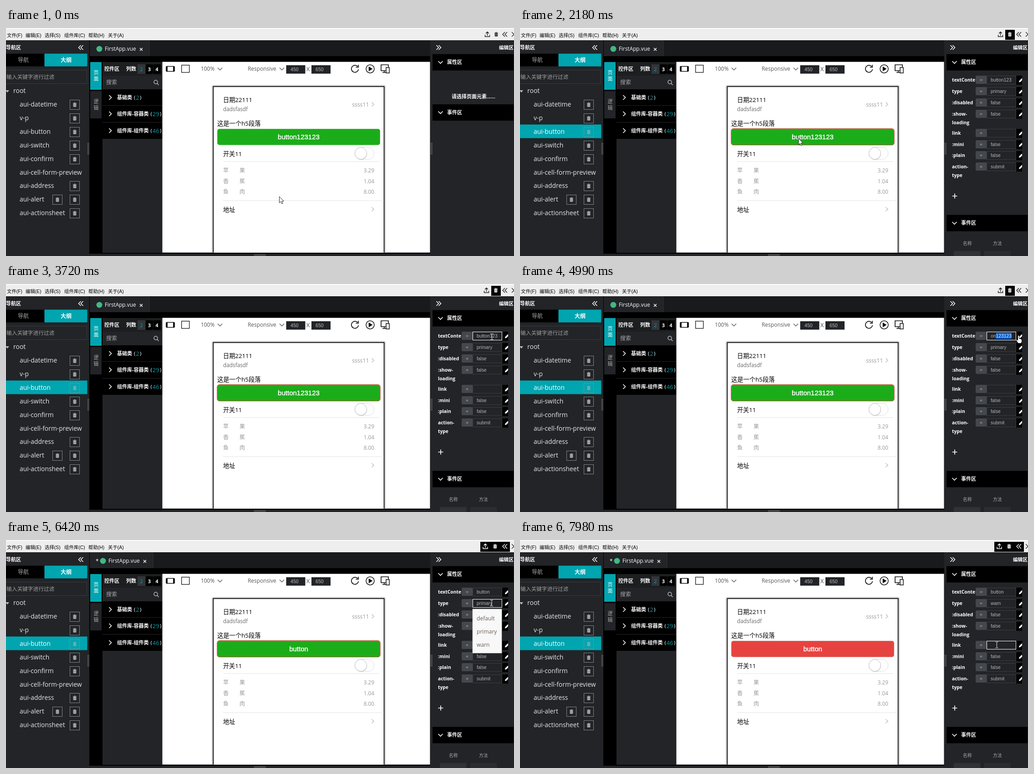
Write an HTML page that moves like this. It is 1116 by 502 pixels and loops after 8000 ms.

```html
<!DOCTYPE html>
<html lang="zh">
<head>
<meta charset="utf-8">
<title>Page designer</title>
<style>
html, body { margin: 0; width: 100%; height: 100%; overflow: hidden; background: #222427; }
svg { display: block; width: 100vw; height: 100vh; }
text { font-family: "Open Sans", "Noto Sans CJK SC", "Noto Sans CJK", sans-serif; white-space: pre; }
.arial { font-family: "Liberation Sans", "Noto Sans CJK SC", "Noto Sans CJK", sans-serif; }
</style>
</head>
<body>
<svg viewBox="0 0 1116 502">
  <defs>
    <filter id="glow" x="-10%" y="-10%" width="120%" height="120%"><feGaussianBlur stdDeviation="1.6"/></filter>
    <clipPath id="field"><rect x="1034" y="105" width="46.5" height="18"/></clipPath>
    <clipPath id="pens"><rect x="1090" y="100" width="13" height="230"/></clipPath>
    <clipPath id="labels"><rect x="940" y="100" width="60" height="240"/></clipPath>
    <clipPath id="canvas"><rect x="344" y="75" width="587" height="419.5"/></clipPath>
  </defs>
  <g id="base"></g>
  <g id="live"></g>
</svg>
<script>
const LOOP = 8000, PANEL = '#222427', CYAN = '#00a5b0', GREEN = '#1aad19', RED = '#e64340';
const PRESS = 1190, SELECT = 1370, ERASE = 5240, COMMIT = 6060, PICK = 7400, DONE = 7740;

const rect = (x, y, w, h, fill, extra = '') =>
  `<rect x="${x}" y="${y}" width="${w}" height="${h}" fill="${fill}" ${extra}/>`;
const frame = (x, y, w, h, color, extra = '') =>
  rect(x + .5, y + .5, w - 1, h - 1, 'none', `stroke="${color}" ${extra}`);
// y is the middle of the capitals
const text = (x, y, s, size, fill = '#fff', extra = '') =>
  `<text x="${x}" y="${y + size * .36}" font-size="${size}" fill="${fill}" ${extra}>${s}</text>`;
const path = (x, y, d, color, w = 1, fill = 'none') =>
  `<path transform="translate(${x} ${y})" d="${d}" stroke="${color}" stroke-width="${w}" fill="${fill}"/>`;
const each = (list, fn) => list.map(fn).join('');

const BOLD = 'font-weight="700"', ARIAL = 'class="arial"';
const MIDDLE = 'text-anchor="middle"', END = 'text-anchor="end"';
const RIGHT = 'M-2.5-5l5 5-5 5', DOWN = 'M-5-2.5l5 5 5-5';
const LESS = 'M0-5l-5 5 5 5M5-5l-5 5 5 5', MORE = 'M-5-5l5 5-5 5M0-5l5 5-5 5';
const UPLOAD = 'M-5 1v4h10v-4M0 3v-8M-3.5-2L0-5.5 3.5-2';

const trash = (x, y, color, back) => path(x, y, 'M-4-3.2h8M-1.4-4.6h2.8M-2.8-2v6h5.6v-6z', color, 1, color) +
  path(x, y, 'M-1.3-1v4M1.3-1v4', back, .7);
const dots = (x, y, cols, rows) => {
  let s = '';
  for (let i = 0; i < cols; i++)
    for (let j = 0; j < rows; j++) s += rect(x + i * 2.4, y + j * 2.4, 1.2, 1.2, '#999');
  return s;
};
const header = (y, name) => rect(937, y, 178, 36, '#000') +
  path(954.5, y + 18, DOWN, '#fff', 1.6) + text(969, y + 18, name, 11, '#fff', BOLD);

const NODES = ['datetime', '', 'button', 'switch', 'confirm', 'cell-form-preview', 'address', 'alert', 'actionsheet'];
function node(i, selected) {
  const y = 168 + 29.9 * i, by = Math.round(y + 1), name = NODES[i] ? 'aui-' + NODES[i] : 'v-p';
  const [edge, icon, back] = selected ? ['#5c9ba0', '#7db0b3', CYAN] : ['#858689', '#c4c4c4', PANEL];
  const box = x => frame(x, by - 11, 22, 22, edge) + trash(x + 11, by, icon, back);
  return (selected ? rect(0, 212.5, 178.5, 30, CYAN) : '') + text(30, y, name, 13.9, selected ? '#fff' : '#e8e8e8') +
    (i == 5 ? '' : box(140)) + (i == 7 ? box(102) : '');
}

function navigator() {
  return rect(0, 0, 1116, 27, '#eeeeee') + rect(0, 0, 1116, 1.5, '#fff') +
    each([[2, '文件(F)'], [43, '编辑(E)'], [85, '选择(S)'], [128, '组件库(C)'], [181, '帮助(H)'], [224, '关于(A)']],
      ([x, s]) => text(x, 16, s, 10.4, '#000', ARIAL)) +
    text(0, 43, '导航区', 11, '#fff', BOLD) + path(164.5, 43, LESS, '#fff', 1.5) +
    rect(0, 56.5, 84.5, 28, '#000') + rect(84.5, 56.5, 94, 28, CYAN) +
    text(38, 71, '导航', 12, '#aaa', MIDDLE) + text(132, 71, '大纲', 12, '#fff', MIDDLE + ' ' + BOLD) +
    frame(-2, 92, 180, 31, '#393b3f') + text(1, 108, '输入关键字进行过滤', 11.7, '#a0a0a0') +
    path(3, 139, 'M-4-2h8l-4 5z', 'none', 0, '#bbb') + text(16, 138, 'root', 14, '#e8e8e8') +
    each(NODES, (_, i) => node(i)) + dots(179, 253, 2, 11);
}

function library() {
  const group = (y, name, x, count) => rect(212, y - 18, 132, 36, '#000') + path(229, y, RIGHT, '#fff', 1.6) +
    text(244, y, name, 11, '#fff', BOLD) + text(x, y, '(', 11.5) +
    text(x + 4.5, y, count, 12.5, CYAN) + text(count > 9 ? 338 : 294, y, ')', 11.5);
  return rect(183, 27, 749, 475, '#000') + rect(184, 27, 748, 35, '#191a1c') +
    rect(185, 75, 25, 61, CYAN) + rect(185, 139, 25, 60, PANEL) +
    text(198, 98, '页', 11, '#fff', MIDDLE) + text(198, 112, '面', 11, '#fff', MIDDLE) +
    text(198, 162, '逻', 11, '#aaa', MIDDLE) + text(198, 176, '辑', 11, '#aaa', MIDDLE) +
    rect(212, 75, 132, 420, PANEL) + rect(212, 75, 132, 30, '#1c1e20') +
    text(216, 90, '控件区', 11, '#fff', BOLD) + text(264, 90, '列数', 11, '#fff', BOLD) +
    rect(289, 80, 17, 21, '#333538') + rect(307, 80, 16, 21, '#000') + rect(324, 80, 16, 21, '#000') +
    text(297.5, 91, 2, 11, CYAN, MIDDLE) + text(315, 91, 3, 11, '#fff', MIDDLE + ' ' + BOLD) +
    text(331.5, 91, 4, 11, '#fff', MIDDLE + ' ' + BOLD) +
    text(220, 120, '搜索', 12, '#a8a8a8') + path(329, 119, 'M4 0a4 4 0 1 0-8 0a4 4 0 1 0 8 0M3 3l3.5 3.5', '#bbb', 1.5) +
    group(153, '基础类', 281, 2) + group(189, '组件库-容器类', 317.5, 29) + group(226, '组件库-组件类', 317.5, 46) +
    rect(212, 170, 132, 1, PANEL) + rect(212, 207, 132, 1, PANEL) +
    rect(183, 497, 749, 5, PANEL) + dots(545, 498, 11, 2);
}

function toolbar() {
  return rect(343.5, 74.5, 588, 420, '#fff') +
    rect(352, 84.5, 18, 11, 'none', 'rx="1.5" stroke="#111" stroke-width="1.6"') +
    rect(351.5, 84.5, 3.5, 11, '#111') + rect(367, 84.5, 3.5, 11, '#111') +
    rect(385.7, 81.7, 17, 16, 'none', 'stroke="#222" stroke-width="1.4"') +
    text(428, 90, '100%', 11.9, '#5d5652') + path(470, 90, DOWN, '#5d5652', 1.3) +
    text(531, 90, 'Responsive', 11.9, '#5d5652') + path(606, 90, DOWN, '#5d5652', 1.3) +
    rect(615.5, 82, 42, 18.5, PANEL) + rect(671, 82, 42, 18.5, PANEL) +
    text(625, 91, 450, 10.6, '#bbb', ARIAL) + text(680, 91, 650, 10.6, '#bbb', ARIAL) + text(660, 90, 'X', 12.5, '#444') +
    path(766.5, 90, 'M6-5a7.7 7.7 0 1 0 1.7 6M7.5-9v5.5h-5.5', '#111', 1.7) +
    path(800, 90, 'M9 0a9 9 0 1 0-18 0a9 9 0 1 0 18 0', '#111', 1.5) + path(800, 90, 'M-3-5L5 0-3 5z', '#111', .5, '#111') +
    path(833, 90, 'M3 4h-12v-13h16v5M-6 8h8M-2 4v4', '#111', 1.7) + path(838.5, 93, 'M-3.5-6h7v12h-7z', '#111', 1.5, '#fff');
}

function phone() {
  const fruit = (y, a, b, price) => text(477, y, a, 12, '#999') + text(513, y, b, 12, '#999') +
    text(809, y, price, 11.7, '#999', END);
  return '<g clip-path="url(#canvas)">' +
    rect(455, 128.5, 376, 400, 'none', 'stroke="#777" stroke-width="3" filter="url(#glow)"') +
    rect(455.5, 129, 375, 400, '#fff', 'stroke="#111" stroke-width="1.7"') + '</g>' +
    text(477, 158, '日期22111', 13.2, '#000') + text(477, 179, 'dadsfasdf', 11.8, '#666') +
    text(760, 169, 'ssss11', 12.3, '#999') + path(806, 168, 'M-2.5-4.5l4.5 4.5-4.5 4.5', '#bbb', 1.4) +
    text(464, 210, '这是一个h5段落', 13.3, '#000') +
    text(477, 277, '开关11', 13.1, '#000') + rect(477, 293.5, 343, 1, '#e2e2e2') +
    rect(766, 262.5, 43, 27, '#fdfdfd', 'rx="13.5" stroke="#dfdfdf"') +
    '<circle cx="780" cy="277" r="13" fill="#aaa" opacity=".6"/>' +
    '<circle cx="779.5" cy="276" r="13" fill="#fff" stroke="#bbb" stroke-width=".8"/>' +
    fruit(314, '苹', '果', '3.29') + fruit(338, '香', '蕉', '1.04') + fruit(361, '鱼', '肉', '8.00') +
    rect(477, 379.5, 353, 1, '#e2e2e2') +
    text(477, 400, '地址', 13.3, '#000') + path(806, 399, 'M-2.5-4.5l4.5 4.5-4.5 4.5', '#bbb', 1.4);
}

const editor = () => dots(933, 253, 2, 11) + path(950.5, 43, MORE, '#fff', 1.5) +
  text(1115, 43, '编辑区', 10.7, '#fff', END + ' ' + BOLD) + header(57.5, '属性区');

function topIcons(t) {
  const saved = t >= COMMIT, picked = t >= SELECT, dark = '#222';
  const box = saved ? rect(1042, 4, 65, 22, '#000') : picked ? rect(1066, 4, 21, 22, '#000') : '';
  return box + path(saved ? 1053 : picked ? 1055.5 : 1057.5, 14, UPLOAD, saved ? '#fff' : dark, 1.4) +
    trash(saved ? 1074.5 : picked ? 1076 : 1077, 14, picked ? '#fff' : dark, picked ? '#000' : '#eee') +
    path(1096, 14, LESS, saved ? '#fff' : dark, 1.4) + path(1113.5, 14, RIGHT, dark, 1.3);
}

function fileTab(t) {
  const dx = t >= COMMIT ? 8 : 0;
  return rect(184, 27, 131 + dx, 35, PANEL) + rect(314.5 + dx, 28, 1, 34, '#333') + (dx ? text(197, 47, '*', 12) : '') +
    `<circle cx="${205 + dx}" cy="46" r="6.5" fill="#41b883"/>` +
    text(217 + dx, 46, 'FirstApp.vue', 11.8) + path(297 + dx, 47, 'M-3-3l6 6M3-3l-6 6', '#fff', 1.4);
}

function button(t) {
  const down = t >= PRESS - 30 && t < SELECT, warn = t >= PICK;
  const ink = down ? ' opacity=".6"' : ' stroke="#fff" stroke-width=".45"';
  return rect(464.3, 222.2, 357.4, 35.2, warn ? RED : down ? '#179b16' : GREEN, 'rx="4.5" stroke="#000" stroke-opacity=".15" stroke-width=".6"') +
    (t >= SELECT && !warn ? rect(463.8, 221.5, 358.4, 36.2, 'none', 'rx="5" stroke="#c8321e"') : '') +
    text(643, 240, t < COMMIT ? 'button123123' : 'button', 15, '#fff', ARIAL + ' ' + MIDDLE + ink);
}

const ROWS = [[114, 'textConte'], [139, 'type'], [164, ':disabled', 'false'], [189, ':show-', 'false'],
  [231, 'link', ''], [256, ':mini', 'false'], [280, ':plain', 'false'], [305, 'action-', 'submit']];

function textField(t, x) {
  const value = (s, left, fill = '#b4b4b4') => text(left, 114, s, 10.3, fill, ARIAL);
  if (t >= ERASE) return value('button', 1034);
  if (t < 4450) return `<g clip-path="url(#field)">${value('button123123', 1034)}</g>`;
  const scroll = 17 * Math.min(1, Math.max(0, (x - 1080) / 14)), start = 1062.6 - scroll;
  return '<g clip-path="url(#field)">' + value('button', 1034 - scroll) +
    value('123123', start) + rect(start, 107.5, Math.max(0, Math.min(x, 1080) - start), 13, '#0b62d6') +
    value('123123', start, '#e8eefc') + '</g>';
}

function properties(t, x) {
  const focused = [t > 2900 && t < COMMIT, t > 5900 && t < PICK, 0, 0, t >= PICK + 200];
  const row = ([y, label, value], i) => text(949, y, label, 10.3, '#fff', BOLD + ' clip-path="url(#labels)"') +
    rect(1001, y - 9, 24, 18, '#44474b', 'rx="2"') + text(1013, y, '=', 10, '#bbb', MIDDLE) +
    frame(1025, y - 9, 65, 19, focused[i] ? '#fff' : '#3b3d41') +
    (i ? text(1034, y, i == 1 ? (t < PICK ? 'primary' : 'warn') : value, 10.3, '#b4b4b4', ARIAL) : textField(t, x)) +
    rect(1090, y - 9, 13, 20, '#000') +
    `<g clip-path="url(#pens)">${path(1100, y + 1, 'M-3.5 4l.8-2.8 5-5 2 2-5 5z', '#fff', 1, '#fff')}</g>`;
  return each(ROWS, row) + text(949, 208, 'loading', 10.3, '#fff', BOLD) + text(949, 324, 'type', 10.3, '#fff', BOLD) +
    path(955, 370, 'M-5.5 0h11M0-5.5v11', '#fff', 1.7) + header(411.5, '事件区') +
    text(973, 474, '名称', 9.8, '#a8a8a8') + text(1039, 474, '方法', 9.8, '#a8a8a8') +
    rect(953, 491, 58.5, 11, '#303235') + rect(1020, 491, 58, 11, '#2a2c2f');
}

const ramp = (t, a, b) => Math.min(1, Math.max(0, (t - a) / (b - a)));
function dropdown(t, y) {
  const show = ramp(t, COMMIT, 6360) * (1 - ramp(t, PICK, DONE - 60));
  if (!show) return '';
  const item = (s, i) => {
    const top = 158 + 29 * i, hover = y > Math.max(top, 153) && y < top + 29 && t > 6800;
    return (hover ? rect(1025, top, 64, 29, '#ececec') : '') + text(1034, top + 14.5, s, 12.1, '#6b625c');
  };
  return `<g opacity="${show * .97}" transform="translate(0 ${152 * (1 - show)}) scale(1 ${show})">` +
    rect(1025, 152, 64, 97, '#fff', 'stroke="#ddd" stroke-width=".6"') + each(['default', 'primary', 'warn'], item) + '</g>';
}

const TRACK = [[0, 600.5, 371], [400, 600.5, 371], [1150, 605.5, 244], [2140, 605.5, 244], [2180, 612, 243],
  [2980, 1073, 118], [3310, 1073, 118], [3720, 1067.5, 116], [3830, 1065, 114], [4010, 1065, 114], [4150, 1062, 114],
  [4450, 1062, 114], [4990, 1095, 113], [5400, 1095, 113], [5800, 1072, 150], [6030, 1067, 139], [6820, 1067, 139],
  [7150, 1049, 216], [7960, 1049, 216], [7980, 1047.5, 231], [LOOP, 1047.5, 231]];
function pointer(t) {
  const i = TRACK.findIndex(k => k[0] > t), [t0, x0, y0] = TRACK[i - 1], [t1, x1, y1] = TRACK[i];
  const p = (t - t0) / (t1 - t0), e = p * p * (3 - 2 * p);
  return [x0 + (x1 - x0) * e, y0 + (y1 - y0) * e];
}
function cursor(t, x, y) {
  if (x < 1025) return path(x, y, 'M0 0V14L3.2 11 5.5 16 7.7 15 5.5 10.2H9.7Z', '#111', .9, '#fff');
  if (x > 1089 || y > 152 && t < 7980)
    return path(x, y, 'M-1.4 1q1.4-2 2.8 0v6l4 1q2 .5 2 2.5v3l-1.5 4h-6.4l-4.3-6.5q0-2.5 2.3-1l1.1 1.3z', '#111', .8, '#fff');
  return path(x, y, 'M-3-6.5h2.2l.8.8.8-.8h2.2M0-5.7v11.4M-3 6.5h2.2l.8-.8.8.8h2.2', '#eee', 1);
}

function scene(t) {
  const [x, y] = pointer(t), picked = t >= SELECT;
  return topIcons(t) + fileTab(t) + button(t) + (picked ? node(2, true) + properties(t, x)
    : text(979, 151, '请选择页面元素......', 11, '#fff', BOLD) + header(168, '事件区')) + dropdown(t, y) + cursor(t, x, y);
}

const live = document.getElementById('live');
document.getElementById('base').innerHTML = rect(0, 0, 1116, 502, PANEL) + navigator() + library() + toolbar() + phone() + editor();
const begin = performance.now();
let shown = '';
function draw() {
  const next = scene((performance.now() - begin) % LOOP);
  if (next !== shown) live.innerHTML = shown = next;
  requestAnimationFrame(draw);
}
draw();
</script>
</body>
</html>
```
